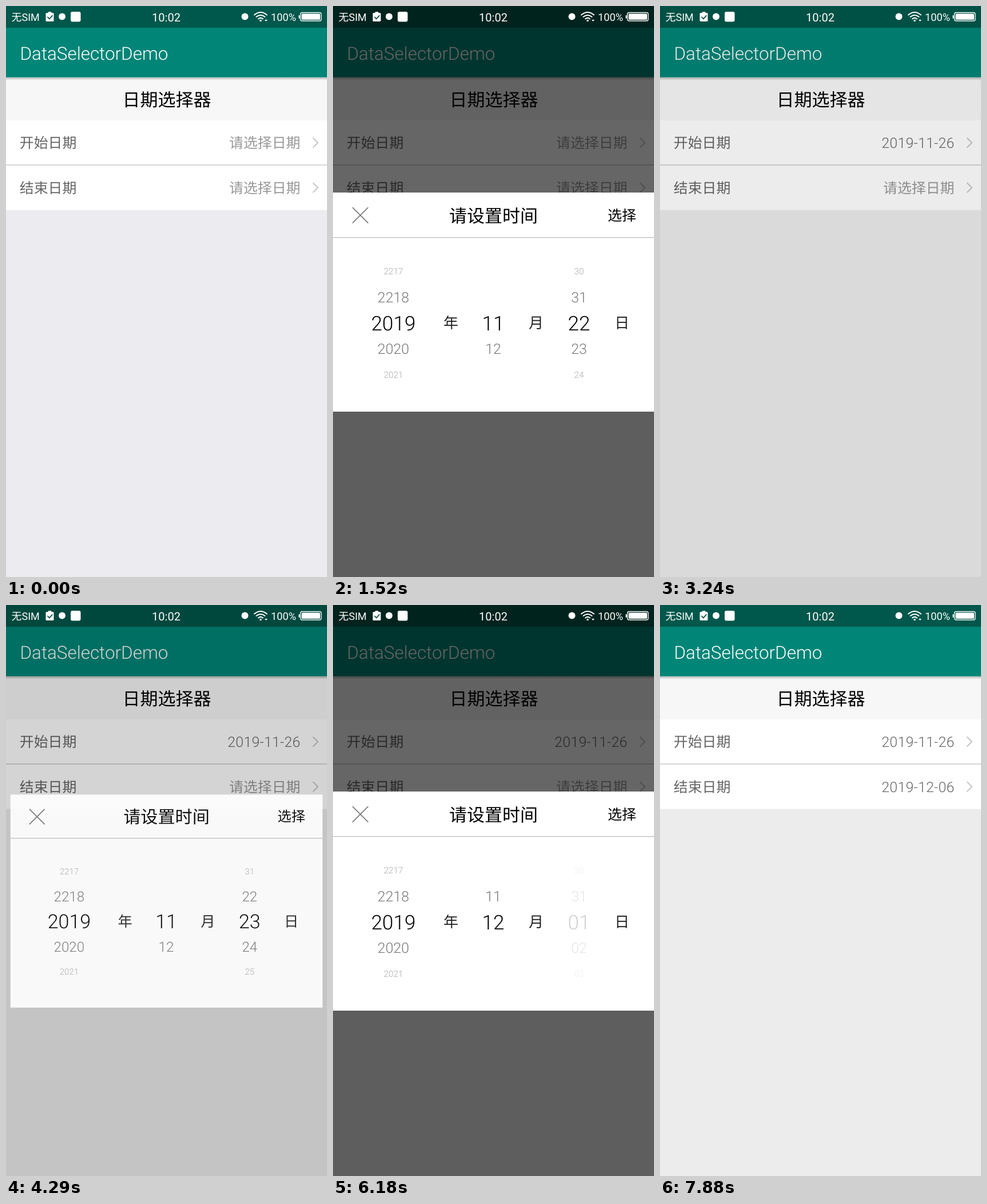
Write an HTML page that moves like this. It is 561x998 px and loops after 8 s.

```html
<!DOCTYPE html>
<html lang="zh-CN">
<head>
<meta charset="utf-8">
<title>日期选择器</title>
<style>
html, body { margin: 0; width: 100%; height: 100%; overflow: hidden; background: #ececec; }
svg { display: block; width: 100%; height: 100%; }
text {
  font-family: Roboto, "Noto Sans CJK SC", "Noto Sans CJK", sans-serif;
  font-weight: 300;
  text-rendering: geometricPrecision;
}
.mid { text-anchor: middle; }
.end { text-anchor: end; }
.bar text { font-weight: 400; fill: #fff; }
.line { fill: none; stroke-linecap: round; stroke-linejoin: round; }
</style>
</head>
<body>
<svg viewBox="0 0 561 998" preserveAspectRatio="none">
  <defs>
    <linearGradient id="shade" x2="0" y2="1">
      <stop offset="0" stop-opacity=".26"/>
      <stop offset="1" stop-opacity="0"/>
    </linearGradient>
    <clipPath id="wheel"><rect y="428" width="561" height="252"/></clipPath>
  </defs>

  <g id="page">
    <rect id="back" width="561" height="998" fill="#ececec"/>
    <rect y="124" width="561" height="76" fill="#f7f7f7"/>
    <rect y="200" width="561" height="156.5" fill="#fff"/>
    <rect y="277" width="561" height="1.6" fill="#ccc"/>
    <rect y="124.600" width="561" height="5.400" fill="url(#shade)"/>
    <rect width="561" height="38" fill="#00574b"/>
    <rect y="38" width="561" height="86.600" fill="#008577"/>
    <text x="24.5" y="94" font-size="31.4" fill="#fff">DataSelectorDemo</text>
    <text class="mid" x="281" y="175" font-size="31" fill="#000">日期选择器</text>
    <g font-size="24.9" fill="#666">
      <text x="23.8" y="248">开始日期</text>
      <text x="23.8" y="326.5">结束日期</text>
      <text class="end" id="start" x="514.5" y="248"></text>
      <text class="end" id="finish" x="514.5" y="326.5"></text>
    </g>
    <path class="line" d="M537 231l8 8-8 8M537 309.500l8 8-8 8" stroke="#c4c4c4" stroke-width="1.8"/>
  </g>

  <rect id="dim" width="561" height="998"/>

  <g id="dialog">
    <rect y="326" width="561" height="383" fill="#fff"/>
    <rect y="404" width="561" height="1.2" fill="#b8b8b8"/>
    <path class="line" d="M34.500 352.500l26.500 26.500m0-26.500l-26.500 26.500" stroke="#707070" stroke-width="1.7"/>
    <g class="mid">
      <text x="280.500" y="377.500" font-size="31">请设置时间</text>
      <text x="505" y="374.500" font-size="25">选择</text>
      <g font-size="26" fill="#222">
        <text x="206" y="563">年</text>
        <text x="355" y="563">月</text>
        <text x="505" y="563">日</text>
      </g>
    </g>
    <g id="wheels" class="mid" clip-path="url(#wheel)"></g>
  </g>

  <g class="bar">
    <text x="9.500" y="25.700" font-size="18">无SIM</text>
    <rect x="69.500" y="12" width="14" height="15" rx="1.5" fill="#fff"/>
    <rect x="73.500" y="10" width="6" height="4" rx="1.5" fill="#fff"/>
    <path class="line" d="M73 19.500l2.800 3 5-5.500" stroke="#00463c" stroke-width="1.8"/>
    <circle cx="98" cy="18.500" r="6" fill="#fff"/>
    <rect x="113" y="10" width="17.500" height="17.500" rx="3" fill="#fff"/>
    <text class="mid" x="280" y="27" font-size="20">10:02</text>
    <circle cx="417.500" cy="18.500" r="6" fill="#fff"/>
    <g class="line" stroke="#fff" stroke-width="2">
      <path d="M434 15.500q11-9 22 0M437.500 19q7.500-6 15 0M441 22.500q4-3.200 8 0"/>
      <rect x="514.500" y="11.500" width="36.500" height="14.500" rx="3" stroke-width="1.3"/>
    </g>
    <circle cx="445" cy="25.500" r="1.8" fill="#fff"/>
    <path d="M452 24h5l-2.500 3z" fill="#fff"/>
    <text x="463" y="26" font-size="18.200">100%</text>
    <rect x="516.500" y="13.500" width="32.500" height="10.500" rx="1.500" fill="#fff"/>
    <rect x="511.500" y="16" width="2" height="6" rx="1" fill="#fff"/>
  </g>
</svg>

<script>
const LOOP = 8000, CENTER = 554.2, STEP = 45.2, REACH = 63, SMALL = 15.4, LARGE = 35;
const SHOWS = [{ open: 748, close: 3020 }, { open: 4228, close: 7630 }];
const PROMPT = '请选择日期';

const $ = id => document.getElementById(id);
const clamp = v => Math.max(0, Math.min(1, v));
const span = (t, from, to) => clamp((t - from) / (to - from));
const wrap = (n, size) => ((n % size) + size) % size;
const pad = n => String(n).padStart(2, '0');

function set(el, attrs) {
  for (const key in attrs) el.setAttribute(key, attrs[key]);
}

// Slow start and stop, like a finger dragging the wheel
function drag(t, from, to) {
  const p = span(t, from, to), n = 2.55;
  return p < .5 ? .5 * (2 * p) ** n : 1 - .5 * (2 - 2 * p) ** n;
}

function makeWheel(x) {
  return Array.from({ length: 7 }, () => {
    const el = document.createElementNS('http://www.w3.org/2000/svg', 'text');
    el.setAttribute('x', x);
    $('wheels').append(el);
    return el;
  });
}

const yearWheel = makeWheel(105.5), monthWheel = makeWheel(280), dayWheel = makeWheel(430);

// pos is an index into a list of size values starting at first
function drawWheel(items, pos, first, size, loops = true, fade = 1) {
  const near = Math.round(pos);
  items.forEach((el, i) => {
    const k = near + i - 3;
    const shift = (k - pos) * STEP;
    const scale = Math.max(0, 1 - (shift / REACH) ** 2);
    const font = SMALL + (LARGE - SMALL) * scale;
    const shown = loops || (k >= 0 && k < size);
    el.textContent = shown ? pad(first + wrap(k, size)) : '';
    set(el, {
      y: CENTER + shift + font * .356,
      'font-size': font,
      fill: k === near ? '#000' : '#444',
      'fill-opacity': (.45 + .55 * scale) * fade
    });
  });
}

function drawDays(t) {
  if (t >= 6100) {
    const fade = Math.abs(1 - 2 * span(t, 6100, 6300));
    drawWheel(dayWheel, 5 * drag(t, 6840, 7000), 1, 31, true, fade);
  } else {
    const pos = t < 3600 ? 4 * drag(t, 1840, 2230) : 1 + 3 * drag(t, 4780, 5140);
    drawWheel(dayWheel, pos, 22, 10);
  }
}

function drawDialog(t) {
  const show = SHOWS[t < 3600 ? 0 : 1];
  const enter = span(t, show.open, show.open + 222);
  const leaveAt = show.close + 20;
  const leave = span(t, leaveAt, leaveAt + 80);
  const scale = (1 - .106 * (1 - enter) ** 4) * (1 - .334 * leave);
  const alpha = clamp(enter / .31) * (1 - leave);
  set($('dim'), { opacity: .6 * enter * (1 - span(t, leaveAt, leaveAt + 230)) });
  set($('dialog'), {
    opacity: alpha,
    transform: `translate(280.5 517.5) scale(${scale}) translate(-280.5 -517.5)`
  });
}

function drawValue(el, value) {
  el.textContent = value || PROMPT;
  set(el, { fill: value ? '#666' : '#999', 'letter-spacing': value ? .25 : 0 });
}

function draw(t) {
  set($('back'), { fill: t < 500 ? '#ecebf0' : '#ececec' });
  drawValue($('start'), t >= 3020 && '2019-11-26');
  drawValue($('finish'), t >= 7630 && '2019-12-06');
  drawWheel(yearWheel, 0, 2019, 200);
  drawWheel(monthWheel, drag(t, 5770, 6100), 11, 2, false);
  drawDays(t);
  drawDialog(t);
}

const began = performance.now();
function tick() {
  draw((performance.now() - began) % LOOP);
  requestAnimationFrame(tick);
}
tick();
</script>
</body>
</html>
```
